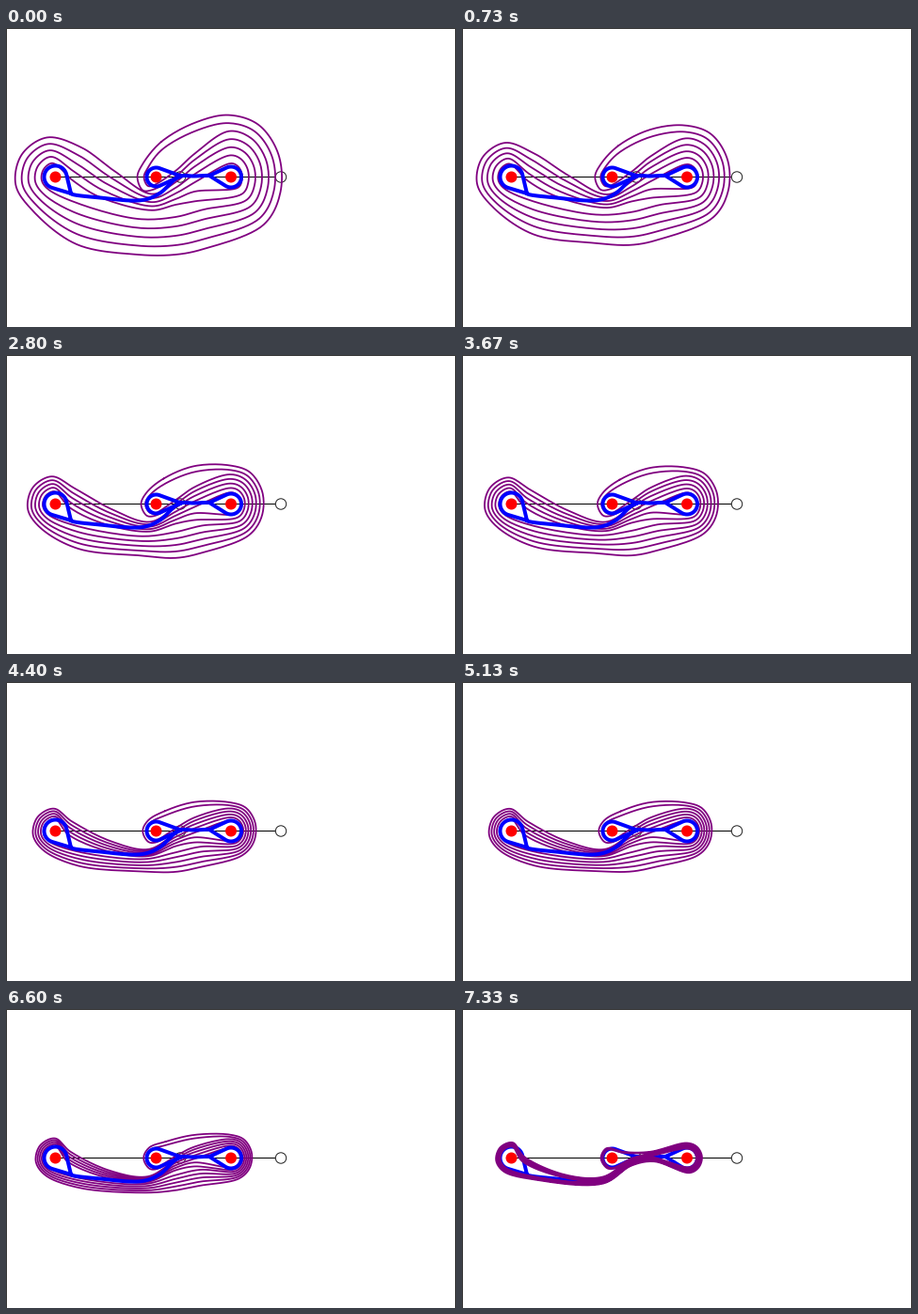
Write a matplotlib script that moves like this. It is 478 px wide and 318 px high and loops after 8 s.

```python
import numpy as np
import matplotlib.pyplot as plt
from matplotlib.animation import FuncAnimation
from matplotlib.patches import Circle

W, H, DPI = 478, 318, 100
LOOP, STEP = 8000, 20
TICK = LOOP / 120
PX = 72 / DPI
MID = 158.5
LEFT, CENTRE, RIGHT = (np.array((x, MID)) for x in (52.5, 159.5, 239))

# Bursts of tightening (first tick, last tick); each keeps the same share of slack
BURSTS = [(10, 11), (21, 28), (32, 45), (54, 61), (65, 66), (76, 89), (98, 99)]
KEEP = .78
SNAP = 110


def slack(tick, bursts):
    if tick >= SNAP:
        return 0.0
    return KEEP ** sum(np.clip((tick - a) / (b - a), 0, 1) for a, b in bursts)


def lerp(a, b, t):
    return a + (b - a) * t


def ring(c, r, start, end, n, squash=1):
    a = np.radians(np.linspace(start, end, n))
    return np.column_stack([c[0] + squash * r * np.cos(a), c[1] + r * np.sin(a)])


def node(loose, tight, outer, ease=1):
    return (*loose, *tight, ease, outer)


def turn(k, count, c, loose, tight, n, squash=1):
    """Arc k of a nest around c; loose and tight hold radii and angles."""
    d = k / (count - 1)
    p = ring(c, lerp(*loose[:2], d), *loose[2:], n, squash)
    q = ring(c, lerp(*tight[:2], d), *tight[2:], n)
    return [node(a, b, k == 0) for a, b in zip(p, q)]


def right_turn(k):
    return turn(k, 7, RIGHT, (66, 14.5, -93, 50), (16, 10, -90, 80), 5, .82)


def left_turn(k):
    return turn(k, 5, LEFT, (43, 15, -102, -235), (16.5, 12, -85, -240), 4)


def centre_turn(k):
    return turn(k, 2, CENTRE, (20, 13, -135, -225), (12, 10, -120, -240), 3)


def strand(i):
    """Nodes of strand i (1 at the top, 14 at the bottom), left to right."""
    off = (i - 9.5) * .8
    stem = 157 + (i - 7.5) * .8
    nodes = []

    def add(loose, tight, ease=1):
        nodes.append(node(loose, tight, i in (1, 14), ease))

    if i <= 2:
        add((165, 112 + 9 * i), (172, 151 + i), .6)
        add((200, 92 + 9 * i), (200, stem), .6)
    elif i <= 9:
        s = i - 3
        if i >= 5:
            d = (i - 5) / 4
            add((80 - 8 * d, 127 + 36 * d), (66 - 2 * d, 157 + 5 * d))
            add((115 - 15 * d, 152 + 28 * d), (110, 180 + off))
            add((155, 168 + 4.3 * s), (150, 182 + off))
        else:
            add((155, 168 + 4.3 * s), (160, 169 + s))
        add((180, 152 + 6 * s), (180, 159 + s if i < 5 else 163 + off), .6)
        add((200, 134 + 6 * s + .4 * s * s), (200, stem), .6)
    else:
        s = 14 - i
        add((75, 230 - 11 * s), (78, 178 + off))
        add((140, 241 - 9.5 * s), (150, 182 + off))
        add((180, 241 - 10 * s), (180, 163 + off), .6)
        add((210, 235 - 10.5 * s), (204, stem), .6)
    return nodes


def trace():
    """Follow the single closed curve through all fourteen strands."""
    nodes, i = [], 1
    for _ in range(7):
        j = 15 - i
        bend = right_turn(min(i, j) - 1)
        nodes += strand(i) + (bend if i < j else bend[::-1]) + strand(j)[::-1]
        if j <= 4:
            i = 5 - j
            bend = centre_turn(min(i, j) - 1)
        else:
            i = 19 - j
            bend = left_turn(min(i, j) - 5)
        nodes += bend if j < i else bend[::-1]
    return np.array(nodes)


def spline(p, n=12):
    """Closed centripetal spline through p."""
    nxt = np.roll(p, -1, 0)
    h = np.sqrt(np.hypot(*(nxt - p).T))[:, None] + 1e-6
    v = (nxt - p) / h
    hb, vb = np.roll(h, 1, 0), np.roll(v, 1, 0)
    m = (vb * h + v * hb) / (h + hb)
    u = (np.arange(n) / n)[None, :, None]
    a, b, ma, mb = (x[:, None] for x in (p, nxt, m * h, np.roll(m, -1, 0) * h))
    q = ((2 * u**3 - 3 * u**2 + 1) * a + (u**3 - 2 * u**2 + u) * ma
         + (3 * u**2 - 2 * u**3) * b + (u**3 - u**2) * mb).reshape(-1, 2)
    return np.vstack([q, q[:1]])


NODES = trace()
LOOSE, TIGHT, EASE = NODES[:, :2], NODES[:, 2:4], NODES[:, 4]
OUTER = NODES[:, 5] > 0


def curve(tick):
    # The inner strands make the first move ahead of the outer one
    w = np.where(OUTER, slack(tick, BURSTS), slack(tick, [(0, 2)] + BURSTS[1:]))
    return spline(lerp(TIGHT, LOOSE, (w ** EASE)[:, None]))


def teardrop(c, r, cusp):
    """Circle around c drawn out to a cusp by its two tangents."""
    dx, dy = np.subtract(cusp, c)
    aim = np.degrees(np.arctan2(dy, dx))
    half = np.degrees(np.arccos(r / np.hypot(dx, dy)))
    return np.vstack([cusp, ring(c, r, aim + half, aim + 360 - half, 40), cusp])


fig = plt.figure(figsize=(W / DPI, H / DPI), dpi=DPI, facecolor="white")
ax = fig.add_axes([0, 0, 1, 1])
ax.set(xlim=(0, W), ylim=(H, 0))
ax.axis("off")


def line(pts, color, width, z):
    return ax.plot(*np.array(pts, float).T, color=color, lw=width * PX, zorder=z, snap=False,
                   solid_joinstyle="round", solid_capstyle="round")[0]


line([(.5, H), (.5, .5), (W - .5, .5), (W - .5, H)], "#303030", 1, 1)
line([(52, MID), (286, MID)], "black", 1, 1)
for x, face in ((185, "none"), (292, "white")):
    ax.add_patch(Circle((x, MID), 5.7, fc=face, ec="#222222", lw=PX, zorder=1))

STEM = [(69, 176), (100, 180.5), (145, 183), (163, 176), (184, 158), (200, 157.5), (216, 157)]
line(spline(np.array(STEM, float))[:-12], "blue", 4, 3)
for c, r, cusp in ((LEFT, 12, STEM[0]), (CENTRE, 10, (186, 157.5)), (RIGHT, 11, STEM[-1])):
    line(teardrop(c, r, cusp), "blue", 4, 3)
    ax.add_patch(Circle(c, 6, color="red", lw=0, zorder=5))

band = line([(0, 0)], "purple", 1.8, 2)


def draw(k):
    tick = int((k * STEP + 15) / TICK)
    band.set_data(*curve(tick).T)
    band.set_zorder(4 if tick >= SNAP else 2)
    return [band]


anim = FuncAnimation(fig, draw, frames=LOOP // STEP, interval=STEP, repeat=True, repeat_delay=0)
plt.show()
```
